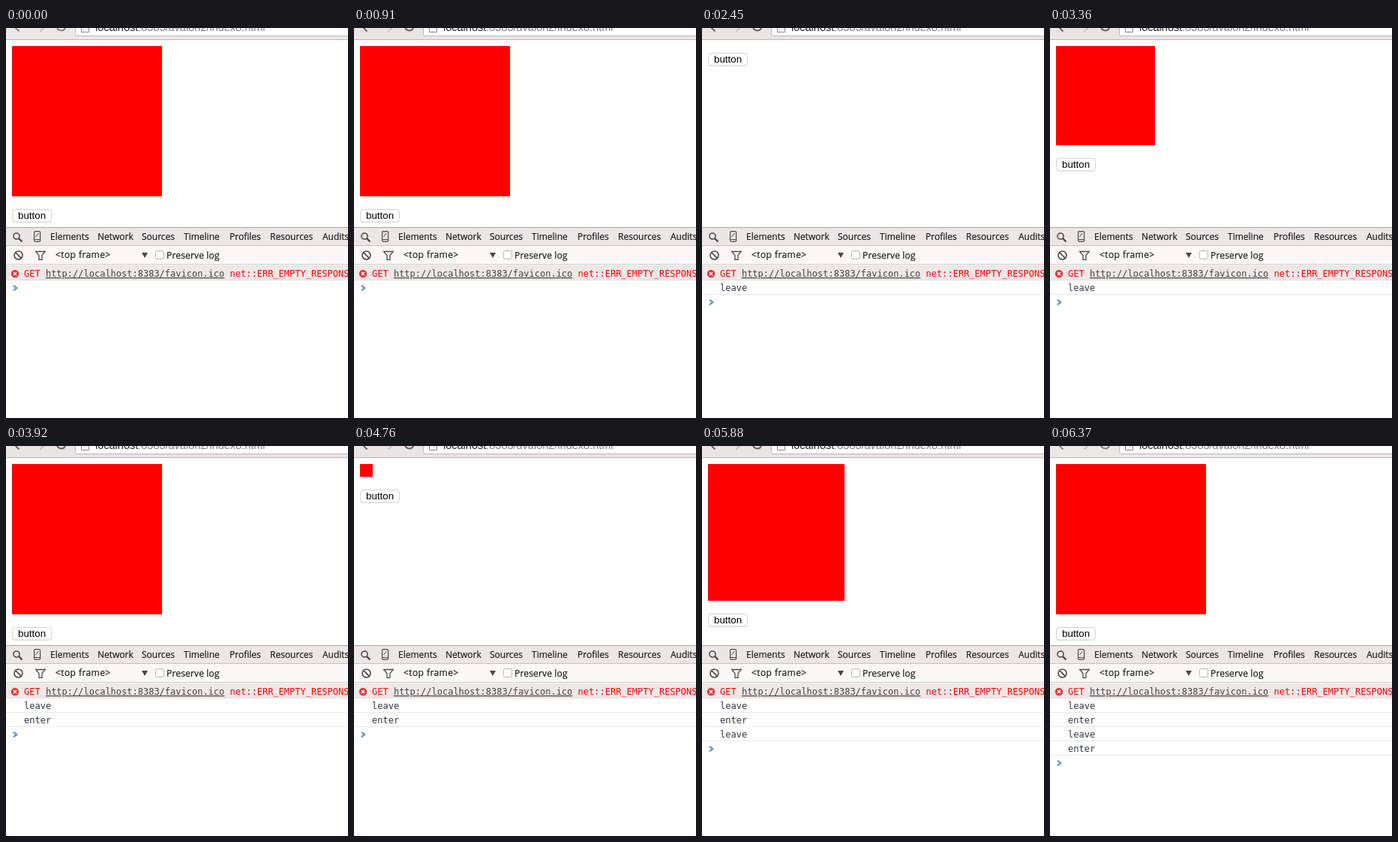
An HTML page for the animation above (6.44 s loop, 456 by 519 pixels).

```html
<!DOCTYPE html>
<html lang="en">
<head>
<meta charset="utf-8">
<title>Enter and leave</title>
<style>
html, body { margin: 0; width: 100%; height: 100%; overflow: hidden; background: #fff; }
svg { display: block; }
text { white-space: pre; }
.ui { font: 12px "Open Sans", "Noto Sans", sans-serif; fill: #1c1c1c; stroke: #1c1c1c; stroke-width: .2px; }
.mono { font: 12px "DejaVu Sans Mono", monospace; }
.page { font: 13.33px "Liberation Sans", Arial, sans-serif; }
.url { font: 14.5px "Liberation Sans", Arial, sans-serif; }
.line { fill: none; stroke: #4e4a4a; stroke-width: 1.6px; }
</style>
</head>
<body>
<svg id="stage" width="456" height="519" viewBox="0 0 456 519">
  <defs>
    <linearGradient id="pressed" x2="0" y2="1">
      <stop stop-color="#6cb3fa"/><stop offset="1" stop-color="#167efb"/>
    </linearGradient>
  </defs>
  <rect width="456" height="519" fill="#fff"/>

  <rect id="bar" width="456" height="15"/>
  <rect y="15" width="456" height="1" fill="#bdb7b7"/>
  <g id="nav" fill="none" stroke-width="2">
    <path d="M11.5 -1.5L17.5 4.5M12 -1H21"/>
    <path d="M51.500 -1.500L45.500 4.500M42 -1H51" stroke="#c9c3c3"/>
    <path d="M68 -1.500A5.800 5.800 0 0 0 79 0"/>
  </g>
  <rect x="92.500" y="-12.500" width="380" height="23" rx="3" fill="#fff" stroke="#bdb7b7"/>
  <path d="M100.500 -8V5.500H110.500V-8" fill="#f4f2f2" stroke="#8e8a8a"/>
  <text class="url" x="119" y="4" fill="#222">localhost<tspan fill="#7d7d7d">:8383/avalon2/index8.html</tspan></text>

  <rect id="box" x="8" y="24" fill="#f00"/>
  <g id="button">
    <rect x="8.500" y="1" width="52" height="17" rx="3.500" fill="#000" opacity=".08"/>
    <rect id="face" x="8.500" y=".5" width="52" height="16.500" rx="3.500" stroke="#d2d2d2"/>
    <text class="page" x="16" y="13" fill="#000">button</text>
  </g>

  <rect y="265" width="456" height="25" fill="#ece6e6"/>
  <rect y="265" width="456" height="1" fill="#aaa5a5"/>
  <rect y="289" width="456" height="1" fill="#c8c2c2"/>
  <g class="line">
    <circle cx="14" cy="277" r="4"/>
    <path d="M17 280L21.500 284.500" stroke-width="2.400"/>
    <rect x="37.600" y="270.600" width="8" height="13.500" rx="1.300" stroke-width="1.200"/>
    <path d="M38 281.500H45.500M39.500 278L43.500 273" stroke-width="1"/>
  </g>
  <g id="tabs" class="ui"></g>

  <rect y="290" width="456" height="24" fill="#faf8f8"/>
  <rect y="314" width="456" height="1" fill="#cfcaca"/>
  <g class="line">
    <circle cx="16.500" cy="302.500" r="5.500"/>
    <path d="M12.600 298.600L20.400 306.400"/>
    <path d="M39.700 297.500H52.300L48 302.500V308.300H44V302.500Z" stroke-width="1.300"/>
  </g>
  <text class="ui" x="66" y="306" letter-spacing=".42">&lt;top frame&gt;</text>
  <path d="M181 299H189L185 306Z" fill="#4a4646"/>
  <rect x="199.500" y="296.500" width="11" height="11" rx="2" fill="#fff" stroke="#b9b5b5"/>
  <text class="ui" x="214" y="307" letter-spacing=".17">Preserve log</text>

  <rect y="317" width="456" height="19" fill="#efe8e8"/>
  <path d="M0 316.500H456M0 335.500H456" stroke="#e8dfdf"/>
  <circle cx="12" cy="327" r="5.200" fill="#e23b3f"/>
  <path d="M10 325L14 329M14 325L10 329" stroke="#fff" stroke-width="1.400"/>
  <text class="mono" x="24" y="331" fill="#f00">GET <tspan fill="#444" text-decoration="underline">http://localhost:8383/favicon.ico</tspan> net::ERR_EMPTY_RESPONSE</text>
  <g id="rows"></g>
  <path id="prompt" d="M10 -3.200L14.300 0L10 3.200" fill="none" stroke="#3b82d8" stroke-width="1.700"/>
</svg>
<script>
const LOOP = 6440, TICK = 70, DURATION = 500, FULL = 200;
const NS = "http://www.w3.org/2000/svg";
const el = id => document.getElementById(id);

function add(parent, tag, attrs, content = "") {
  const node = document.createElementNS(NS, tag);
  for (const key in attrs) node.setAttribute(key, attrs[key]);
  node.textContent = content;
  return parent.appendChild(node);
}

const tabs = { Elements: 59, Network: 122, Sources: 181, Timeline: 237, Profiles: 298, Resources: 352, Audits: 422 };
for (const name in tabs) add(el("tabs"), "text", { x: tabs[name], y: 282 }, name);

// press and release of the button, start of the transition, log entry
const runs = [
  { kind: "leave", press: 1680, release: 1820, start: 1855, done: 2450 },
  { kind: "enter", press: 3010, release: 3150, start: 3168, done: 3780 },
  { kind: "leave", press: 4270, release: 4410, start: 4436, done: 4970 },
  { kind: "enter", press: 5390, release: 5530, start: 5559, done: 6160 }
];

const rows = runs.map(({ kind }, i) => {
  const row = add(el("rows"), "g", { transform: `translate(0 ${336 + 19 * i})` });
  add(row, "text", { class: "mono", x: 24, y: 14, fill: "#303640" }, kind);
  add(row, "rect", { y: 18, width: 456, height: 1, fill: "#e9e9e9" });
  return row;
});

// cubic-bezier(.25, .1, .25, 1)
function ease(x) {
  if (x <= 0) return 0;
  if (x >= 1) return 1;
  let low = 0, high = 1;
  for (let i = 0; i < 24; i++) {
    const s = (low + high) / 2;
    if (.75 * s - .75 * s * s + s ** 3 < x) low = s; else high = s;
  }
  const s = low, r = 1 - s;
  return .3 * r * r * s + 3 * r * s * s + s ** 3;
}

function draw(time) {
  const t = Math.floor(time / TICK) * TICK;
  let size = FULL, removed = false, pressed = false, logged = 0;

  runs.forEach((run, i) => {
    if (t >= run.press && t < run.release) pressed = true;
    if (t >= run.release) {
      const p = ease((t - run.start) / DURATION);
      const leaving = run.kind === "leave";
      size = Math.round(FULL * (leaving ? 1 - p : p));
      removed = leaving && t >= run.done;
    }
    const done = t >= run.done;
    if (done) logged++;
    rows[i].setAttribute("visibility", done ? "visible" : "hidden");
  });

  el("box").setAttribute("width", size);
  el("box").setAttribute("height", size);
  el("button").setAttribute("transform", `translate(0 ${removed ? 33 : 41 + size})`);
  el("face").setAttribute("fill", pressed ? "url(#pressed)" : "#fff");
  el("prompt").setAttribute("transform", `translate(0 ${346 + 19 * logged})`);

  const active = t >= 910 && t < 6370;
  el("bar").setAttribute("fill", active ? "#eae4e4" : "#ede8e8");
  el("nav").setAttribute("stroke", active ? "#696464" : "#8b8686");
}

const origin = performance.now();
function frame() {
  draw((performance.now() - origin) % LOOP);
  requestAnimationFrame(frame);
}
frame();
</script>
</body>
</html>
```
